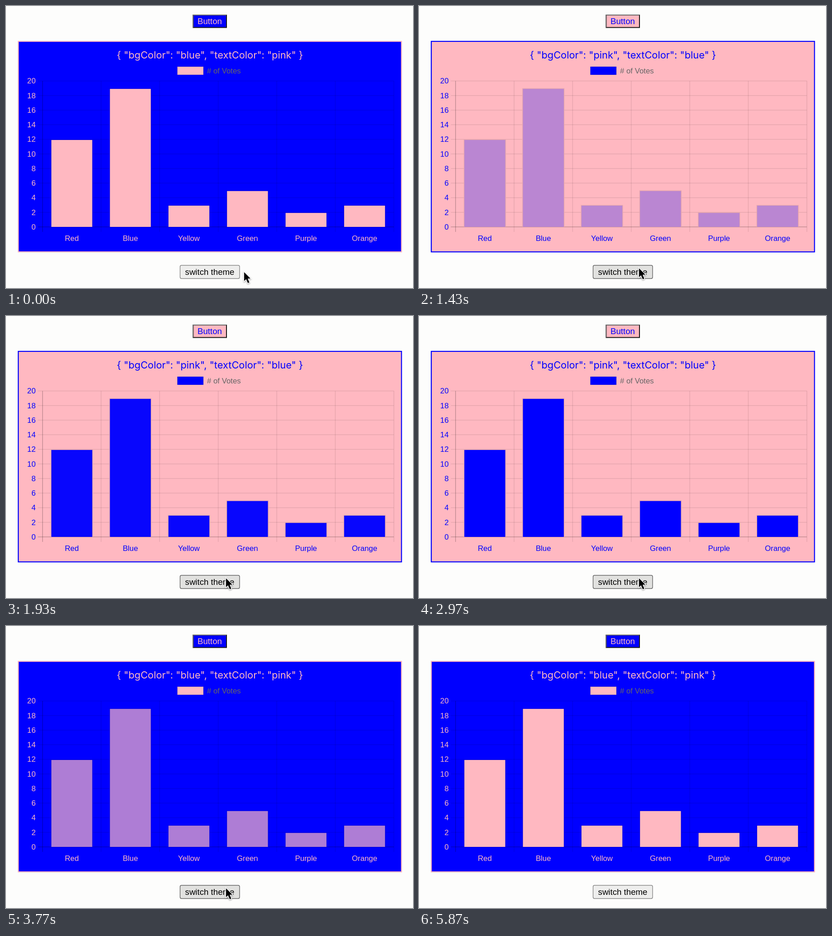
Animation, 899 px wide and 623 px high, one loop 5910 ms. Source, as an HTML page with a canvas:

```html
<!DOCTYPE html>
<html lang="en">
<head>
<meta charset="utf-8">
<title>Theme switch</title>
<style>
  html, body { margin: 0; width: 100%; height: 100%; overflow: hidden; background: #fdfdfc; }
  canvas { display: block; }
</style>
</head>
<body>
<canvas id="stage" width="899" height="623"></canvas>
<script>
const ctx = document.getElementById('stage').getContext('2d');
const LOOP = 5910, FADE = 1000;
const TO_PINK = 1355, TO_BLUE = 3522;
const EXIT = 5600, GONE = 5840;
const PINK = [255, 184, 193], BLUE = [0, 0, 255];
const SANS = '"Liberation Sans", Arial, sans-serif';

const themes = {
  blue: { bg: BLUE, fg: PINK, title: '{ "bgColor": "blue", "textColor": "pink" }' },
  pink: { bg: PINK, fg: BLUE, title: '{ "bgColor": "pink", "textColor": "blue" }' }
};
const labels = ['Red', 'Blue', 'Yellow', 'Green', 'Purple', 'Orange'];
const votes = [12, 19, 3, 5, 2, 3];

// Plot area
const LEFT = 80.7, RIGHT = 856.7, TOP = 165.6, BASE = 488;
const COL = (RIGHT - LEFT) / labels.length;
const LINE = 1.4;
const yAt = v => BASE - (BASE - TOP) * v / 20;

const css = c => `rgb(${c.map(Math.round).join(',')})`;
const mix = (a, b, k) => a.map((v, i) => v + (b[i] - v) * k);
const clamp = k => Math.max(0, Math.min(1, k));
const outQuart = k => 1 - (1 - k) ** 4;
const inOut = k => k * k * (3 - 2 * k);

function rect(x, y, w, h, fill) {
  ctx.fillStyle = fill;
  ctx.fillRect(x, y, w, h);
}

function text(str, x, y, size, fill, align = 'center', family = SANS) {
  ctx.font = `${size}px ${family}`;
  ctx.textAlign = align;
  ctx.fillStyle = fill;
  ctx.fillText(str, x, y);
}

function polygon(points) {
  ctx.beginPath();
  points.forEach(([x, y]) => ctx.lineTo(x, y));
  ctx.closePath();
}

function drawThemeButton(theme) {
  const x = 412.5, y = 19, w = 75.5, h = 29.5, b = 2;
  rect(x, y, w, h, '#161616');
  ctx.fillStyle = '#686868';
  polygon([[x, y], [x + w, y], [x + w - b, y + b], [x + b, y + b], [x + b, y + h - b], [x, y + h]]);
  ctx.fill();
  rect(x + b, y + b, w - 2 * b, h - 2 * b, css(theme.bg));
  text('Button', 450, 40, 18.67, css(theme.fg));
}

function drawPanel(theme) {
  const fg = css(theme.fg);
  rect(26, 77, 848.7, 467.3, fg);
  rect(28.2, 79.2, 844.3, 462.9, css(theme.bg));
  text(theme.title, 450.5, 116, 21.8, fg, 'center', 'Inter, "Open Sans", sans-serif');
  rect(378.5, 134, 57.5, 18, fg);
  ctx.strokeStyle = 'rgba(0,0,0,.1)';
  ctx.lineWidth = LINE;
  ctx.strokeRect(378.8, 134.3, 57, 17.4);
  text('# of Votes', 444, 149, 16.8, '#666', 'left');
}

function drawGrid(fg) {
  const shade = zero => `rgba(0,0,0,${zero ? 0.25 : 0.1})`;
  for (let v = 0; v <= 20; v += 2) {
    rect(70.5, yAt(v) - LINE / 2, RIGHT - 70.5, LINE, shade(v === 0));
    text(v, 65.5, yAt(v) + 5.8, 16.8, fg, 'right');
  }
  for (let i = 0; i <= labels.length; i++) {
    rect(LEFT + COL * i - LINE / 2, TOP, LINE, 499 - TOP, shade(i === 0));
  }
  labels.forEach((name, i) => text(name, LEFT + COL * (i + 0.5), 519, 16.8, fg));
}

function drawBars(fill, bg) {
  const w = COL * 0.72;
  votes.forEach((v, i) => {
    const x = LEFT + COL * (i + 0.5) - w / 2, y = yAt(v);
    rect(x, y, w, BASE - y, css(mix(bg, [0, 0, 0], 0.1)));
    rect(x + LINE, y + LINE, w - 2 * LINE, BASE - y - LINE, fill);
  });
}

function drawSwitch(hover) {
  ctx.beginPath();
  ctx.roundRect(384.5, 572.9, 131.5, 29.2, 3);
  ctx.fillStyle = hover ? '#e1e1df' : '#eeeeed';
  ctx.fill();
  ctx.strokeStyle = hover ? '#4f4f4f' : '#767676';
  ctx.lineWidth = 1.2;
  ctx.stroke();
  text('switch theme', 450, 594, 18.67, '#000');
}

function drawCursor([x, y]) {
  ctx.save();
  ctx.translate(x, y);
  polygon([[1, 2.5], [1, 22], [5.4, 18], [9.2, 26.6], [12.6, 25.2], [9, 16.8], [15, 16.4]]);
  ctx.lineJoin = 'miter';
  ctx.lineWidth = 2.6;
  ctx.strokeStyle = '#fff';
  ctx.shadowColor = 'rgba(0,0,0,.35)';
  ctx.shadowBlur = 3;
  ctx.shadowOffsetY = 1.5;
  ctx.stroke();
  ctx.shadowColor = 'transparent';
  ctx.fillStyle = '#000';
  ctx.fill();
  ctx.restore();
}

function cursorAt(t) {
  const rest = [485, 577];
  if (t < EXIT) return mix([525, 585.5], rest, inOut(clamp((t - 30) / 500)));
  return mix(rest, [800, 19], clamp((t - EXIT) / (GONE - EXIT)) ** 2);
}

function draw(t) {
  const pink = t >= TO_PINK && t < TO_BLUE;
  const theme = pink ? themes.pink : themes.blue;
  const since = pink ? t - TO_PINK : t < TO_PINK ? FADE : t - TO_BLUE;
  const barColor = mix(theme.bg, theme.fg, outQuart(clamp(since / FADE)));
  const cursor = cursorAt(t);
  const hover = t < GONE && cursor[0] < 516 && cursor[1] > 572;

  rect(0, 0, 899, 623, '#fdfdfc');
  drawThemeButton(theme);
  drawPanel(theme);
  drawGrid(css(theme.fg));
  drawBars(css(barColor), theme.bg);
  drawSwitch(hover);
  if (t < GONE) drawCursor(cursor);
}

const start = performance.now();
function tick() {
  draw((performance.now() - start) % LOOP);
  requestAnimationFrame(tick);
}
tick();
</script>
</body>
</html>
```
